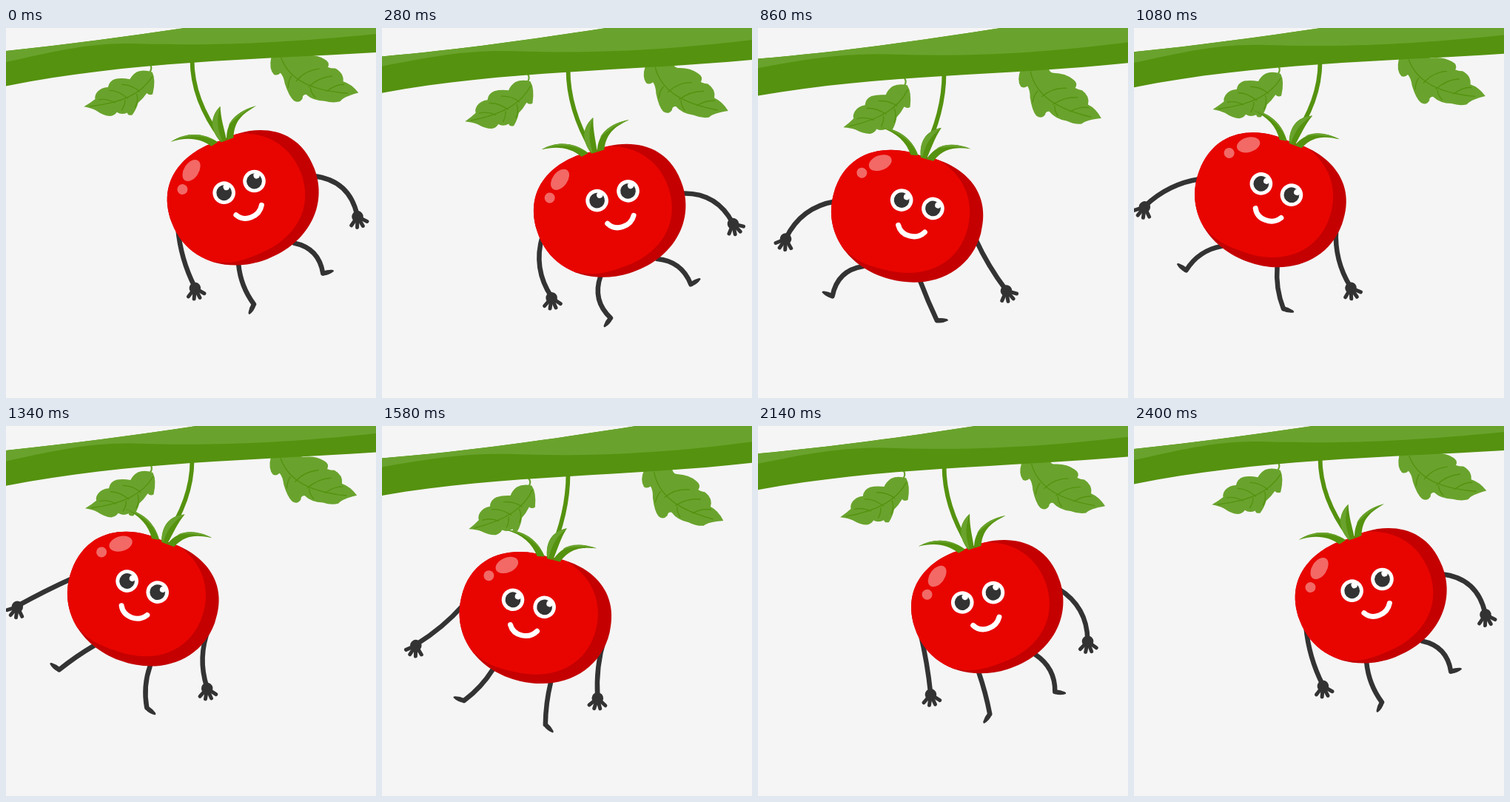
An HTML page with a canvas for the animation above (2.42 s loop, 500 by 500 pixels).

```html
<!DOCTYPE html>
<html lang="en">
<head>
<meta charset="utf-8">
<title>Swinging tomato</title>
<style>
  html, body { margin: 0; width: 100%; height: 100%; overflow: hidden; background: #f5f5f5; }
  canvas { display: block; }
</style>
</head>
<body>
<canvas id="stage" width="500" height="500"></canvas>
<script>
const ctx = document.getElementById('stage').getContext('2d');
const LOOP = 2420, SWING = 2400, RAD = Math.PI / 180;
const LIGHT = '#69a32d', DARK = '#55920f', INK = '#333333';

const shapes = {
  body: 'M0-84C35-90 103-76 103-4C103 50 58 87.5 0 87.5C-58 87.5-103 50-103-4C-103-76-35-90 0-84Z',
  lit: 'M20-86C60-75 84-45 84-5C84 45 45 77-10 77C-35 78-52 75-66 66L-200 66L-200-200L20-200Z',
  smile: 'M-17.5 33.8C-10 47.5 11 47.5 19.5 33.8',
  sepals: 'M-65-107C-42-112-20-104-6-84L-16-82C-26-97-42-106-65-107Z' +
    'M-2-82C-9-100-6-119 14.5-128C9-112 9-100 6-82Z' +
    'M6-82C14-106 34-114 60-111C44-108 26-106 16-82Z',
  sepalLight: 'M-65-107C-42-112-20-104-6-84C-20-100-38-108-65-107Z' +
    'M-2-84C-9-100-6-119 14.5-128C4-114 0-104 0-84Z' +
    'M15-99C24-109 40-113 60-111C42-110 28-106 15-99Z',
  leftLeaf: 'M204 88Q192 86 184 91Q178 96 176 103Q165 103 157 106Q149 110 149 119Q140 121 136 128Q133 134 135 138' +
    'Q130 144 122 151Q132 151 139 153Q150 158 159 157Q165 155 167 150Q174 153 181 148Q182 152 188 150' +
    'Q192 142 193 132Q198 126 202 117Q206 120 210 117Q211 97 204 88Z',
  leftVeins: 'M205 94C195 119 172 136 130 149M192 117Q181 110 167 112M178 129Q164 121 152 123M162 138Q150 134 140 138M189 121Q193 129 190 139M175 132Q176 139 173 146',
  petiole: 'M197 77C203 80 203 87 198 91',
  rightLeaf: 'M353 66Q346 80 351 89Q355 92 360 89Q363 94 362 105Q363 123 368 130Q374 136 380 130Q381 125 386 126' +
    'Q393 137 408 141Q418 147 428 147Q434 142 455 142Q449 128 439 122Q443 111 433 102Q428 101 424 98' +
    'Q429 92 422 86Q413 77 397 75Q389 74 391 60Z',
  rightVeins: 'M366 70C370 104 398 124 441 139M373 97Q367 103 365 111M378 105Q394 94 412 97M394 119Q393 126 397 133M392 117Q409 108 426 111M414 129Q428 123 439 126'
};
for (const k in shapes) shapes[k] = new Path2D(shapes[k]);

// 0 -> 1 -> 0 over one period, eased in and out with the given power
function pingPong(t, period, power) {
  const p = (t % period) / period * 2;
  const q = p < 1 ? p : 2 - p;
  return q < 0.5 ? 0.5 * (2 * q) ** power : 1 - 0.5 * (2 - 2 * q) ** power;
}

function fill(path, color) {
  ctx.fillStyle = color;
  ctx.fill(path);
}

function stroke(path, color, width) {
  ctx.strokeStyle = color;
  ctx.lineWidth = width;
  ctx.stroke(path);
}

function oval(x, y, rx, ry, angle, color) {
  ctx.beginPath();
  ctx.ellipse(x, y, rx, ry, angle, 0, 7);
  ctx.fillStyle = color;
  ctx.fill();
}

function group(draw) {
  ctx.save();
  draw();
  ctx.restore();
}

function leaf(outline, veins, lift, dx, dy, px, py, turn) {
  group(() => {
    ctx.translate(px + dx * lift, py + dy * lift);
    ctx.rotate(turn * lift * RAD);
    ctx.translate(-px, -py);
    if (outline === shapes.leftLeaf) stroke(shapes.petiole, LIGHT, 2.2);
    fill(outline, LIGHT);
    stroke(veins, DARK, 1.4);
  });
}

function branch(sag) {
  const y = (up, down) => up + (down - up) * sag;
  const top = `M0 ${y(31, 48)}C170 ${y(13, 36)} 300 ${y(-9, 11)} 500 ${y(-40, -18)}`;
  fill(new Path2D(`${top}L500 ${y(33, 56)}C333 ${y(43, 78)} 167 ${y(45, 73)} 0 ${y(78.5, 99.5)}Z`), DARK);
  fill(new Path2D(`${top}L500 ${y(8, 26)}C${y(360, 380)} ${y(22, 44)} 270 ${y(24, 48)} 170 ${y(21, 44)}` +
    `C110 ${y(20, 43)} 60 ${y(33, 49)} 0 ${y(46, 59)}Z`), LIGHT);
}

// Angles are degrees outward from straight down
function limb(side, x, y, length, angle, bend, tipAngle, drawTip) {
  group(() => {
    ctx.scale(side, 1);
    ctx.translate(x, y);
    ctx.rotate(-angle * RAD);
    stroke(new Path2D(`M0 0Q${2 * bend} ${length / 2} 0 ${length}`), INK, 6.5);
    ctx.translate(0, length);
    ctx.rotate((angle - tipAngle) * RAD);
    drawTip();
  });
}

function hand() {
  ctx.translate(0, 1.5);
  oval(0, 0, 7.8, 7.8, 0, INK);
  for (const a of [-49, -16, 16, 49]) {
    const x = Math.sin(a * RAD) * 14.5, y = Math.cos(a * RAD) * 14.5;
    stroke(new Path2D(`M0 0L${x} ${y}`), INK, 5);
  }
}

function foot() {
  fill(new Path2D('M-3 0Q-4 8 0 15Q2 15.5 2.5 13Q4 7 3 0Z'), INK);
}

function eye(x, y) {
  oval(x, y, 15.3, 15.3, 0, '#fff');
  oval(x, y, 10.4, 10.4, 0, INK);
  oval(x + 5.5, y - 6, 4.1, 4.1, 0, '#fff');
}

function tomato(t, swing, sag) {
  const wave = Math.sin(2 * Math.PI * t / SWING);
  const lagWave = Math.sin(2 * Math.PI * (t - 340) / SWING);
  const bendWave = Math.cos(2 * Math.PI * (t - 55) / SWING);

  limb(-1, 98, 5, 83, 5 + 39 * swing, 4 + 8.5 * wave, 10 - 7 * swing, hand);
  limb(1, 98, 5, 80, 27 + 24.3 * wave, 3.5 + 11 * bendWave, 14 + 27 * lagWave, hand);
  limb(-1, 39, 80, 58, 36 * swing, 4 + 8 * wave, 44 + 59 * swing, foot);
  limb(1, 41, 80, 57, 22.7 + 19.8 * wave, 3 + 7 * bendWave, 80 + 30 * wave, foot);

  fill(shapes.body, '#c50000');
  group(() => {
    ctx.clip(shapes.body);
    fill(shapes.lit, '#e80500');
  });
  const shine = 'rgba(255,255,255,.4)';
  oval(-53, -61, 16, 10, -36 * RAD, shine);
  oval(-73.5, -41.5, 7, 7, 0, shine);

  group(() => {
    ctx.translate(13.8 * wave - 0.8, -17 - 2.4 * sag - 1.7 * wave);
    eye(-21.9, 0);
    eye(21.9, 0);
    stroke(shapes.smile, '#fff', 7);
  });
}

function draw(now) {
  const t = Math.min(now % LOOP, SWING);
  const swing = pingPong(t, SWING, 2.2), sag = pingPong(t, SWING / 2, 2);
  const lift = 1 - sag;
  const angle = 21 * (2 * swing - 1) * RAD;
  const px = 251.5, py = 47 + 29 * sag;
  const hang = () => {
    ctx.translate(px, py);
    ctx.rotate(angle);
    ctx.translate(0, 196.5);
  };

  ctx.fillStyle = '#f5f5f5';
  ctx.fillRect(0, 0, 500, 500);
  ctx.lineCap = ctx.lineJoin = 'round';

  leaf(shapes.leftLeaf, shapes.leftVeins, lift, -4.5, -29, 199, 79, 10.8);
  leaf(shapes.rightLeaf, shapes.rightVeins, lift, 6, -28, 361, 70, -14.8);

  group(() => {
    hang();
    tomato(t, swing, sag);
  });
  const x = px - 110 * Math.sin(angle), y = py + 110 * Math.cos(angle);
  stroke(new Path2D(`M${px} ${py - 4}Q${px} ${py + 50} ${x} ${y}`), DARK, 5.8);
  group(() => {
    hang();
    fill(shapes.sepals, DARK);
    fill(shapes.sepalLight, LIGHT);
  });
  branch(sag);
}

function frame() {
  draw(performance.now());
  requestAnimationFrame(frame);
}
frame();
</script>
</body>
</html>
```
